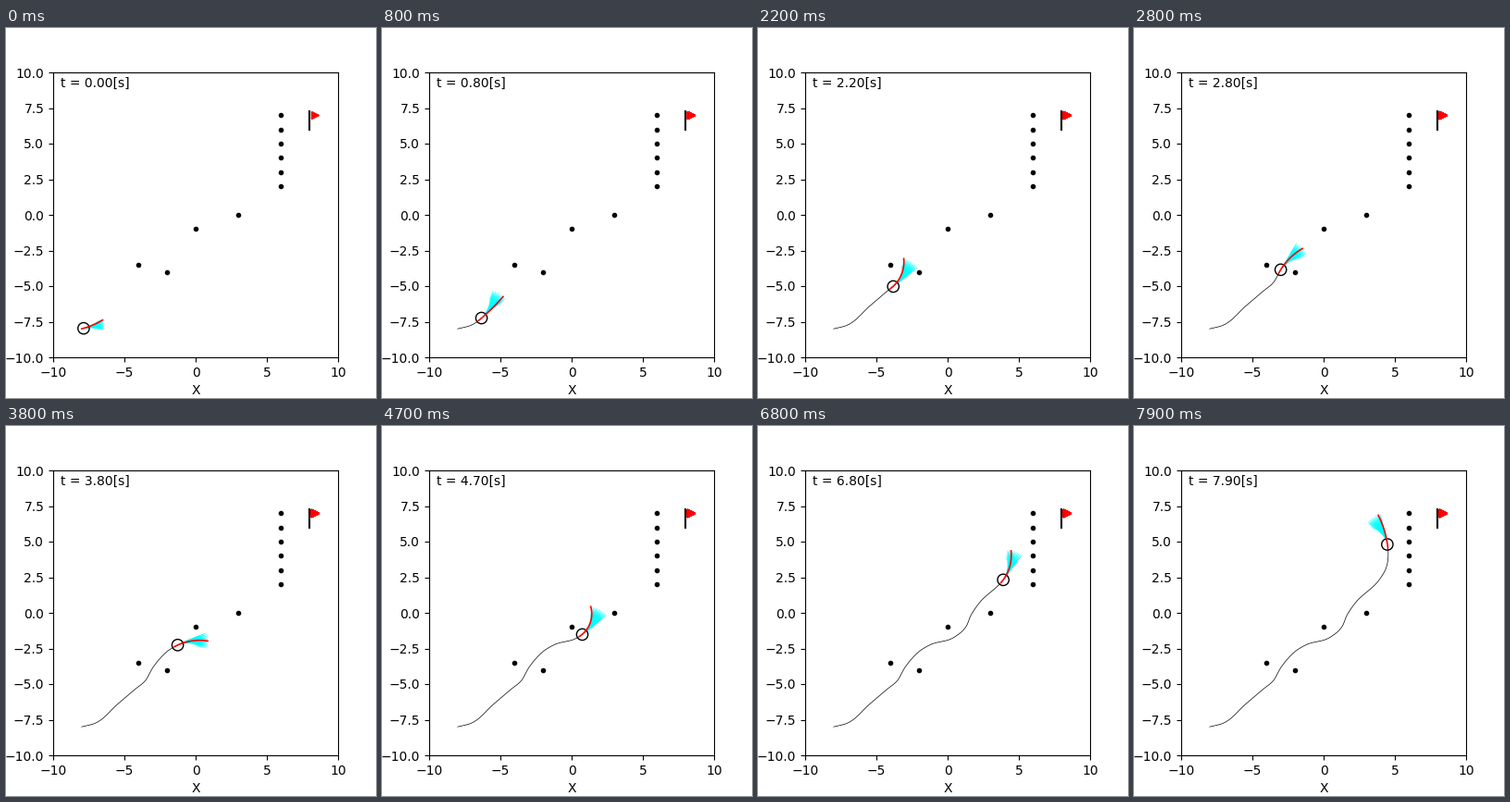
These frames come from a looping animation (400x400 px, 8 s). A matplotlib script:

```python
import numpy as np
import matplotlib.pyplot as plt
from matplotlib.animation import FuncAnimation
from matplotlib.collections import LineCollection

FRAMES, DT = 80, 0.1
CRUISE, LAG, RAMP = 2.4, 0.2, 0.25   # speed, distance lost and time to speed up
HORIZON = 0.9                        # seconds looked ahead

# Bends of the route between the obstacles
WAYPOINTS = np.array([
    (-8, -8), (-7.08, -7.76), (-5.42, -6.36), (-4.16, -5.29), (-3.6, -4.84),
    (-2.96, -3.78), (-1.85, -2.6), (-1.2, -2.23), (0.36, -1.77), (1.27, -1.01),
    (1.64, -0.16), (2.21, 0.68), (3.92, 2.34), (4.35, 3.05), (4.51, 4.58),
    (4.2, 5.7)])


def distances(p):
    return np.r_[0, np.hypot(*np.diff(p, axis=0).T).cumsum()]


def smooth(p, count=3000):
    """Cubic Hermite curve through the points p."""
    k = distances(p)
    m = np.gradient(p, k, axis=0)
    s = np.linspace(0, k[-1], count)
    i = np.clip(np.searchsorted(k, s, side="right") - 1, 0, len(k) - 2)
    h = (k[i + 1] - k[i])[:, None]
    u = (s - k[i])[:, None] / h
    return ((1 + 2 * u) * (1 - u) ** 2 * p[i] + u * (1 - u) ** 2 * h * m[i]
            + u * u * (3 - 2 * u) * p[i + 1] + u * u * (u - 1) * h * m[i + 1])


ROUTE = smooth(WAYPOINTS)
LENGTH = distances(ROUTE)
YAW = np.unwrap(np.arctan2(*np.gradient(ROUTE, axis=0).T[::-1]))


def travelled(t):
    def run(t):
        return CRUISE * t - LAG * (1 - np.exp(-t / RAMP))
    return run(t) - run(-DT)


def speed(t):
    return CRUISE - LAG / RAMP * np.exp(-t / RAMP)


def position(t):
    s = travelled(t)
    return np.array([np.interp(s, LENGTH, ROUTE[:, k]) for k in (0, 1)])


def heading(t):
    return np.interp(travelled(t), LENGTH, YAW)


def turn(t0, t1):
    return heading(t1) - heading(t0)


def arc(start, angle, bend, length, first=0.0):
    """Circular arc whose chord is turned by bend from the start angle."""
    s = np.linspace(first, 1, 12)
    r = length * s * np.sinc(bend * s / np.pi)
    a = angle + bend * s
    return np.column_stack([start[0] + r * np.cos(a), start[1] + r * np.sin(a)])


def best_arc(t):
    t0 = t - DT
    return arc(position(t0), heading(t0), 1.1 * turn(t0, t0 + 0.5),
               speed(t) * (HORIZON + DT))


def fan_arcs(t):
    mid, reach = turn(t - 0.2, t + 0.2), speed(t) * HORIZON
    return [arc(position(t), heading(t), mid + off, reach * v, 0.16)
            for v in np.linspace(0.75, 1, 5)
            for off in np.linspace(-0.25, 0.25, 11)]


fig, ax = plt.subplots(figsize=(4, 4), dpi=100)
ax.set_aspect("equal")
ax.set_xlim(-10, 10)
ax.set_ylim(-10, 10)
ax.set_xlabel("X")

obstacles = [(-4, -3.5), (-2, -4), (0, -1), (3, 0)] + [(6, y) for y in range(2, 8)]
ax.plot(*zip(*obstacles), "k.")
ax.plot([8, 8], [6, 7.3], "k-")
flag, = ax.plot([], [], "r>")

trail, = ax.plot([], [], "k-", lw=0.5)
fan = ax.add_collection(LineCollection([], colors="cyan", linewidths=0.35, zorder=2))
body = ax.add_patch(plt.Circle((0, 0), 0.4, fill=False, ec="k", lw=1, zorder=3))
best, = ax.plot([], [], "r-", lw=1.2, zorder=4)
clock = ax.text(-9.5, 9, "")


def update(n):
    t = n * DT
    trail.set_data(*position(np.arange(n + 1) * DT - DT))
    fan.set_segments(fan_arcs(t))
    best.set_data(*best_arc(t).T)
    body.center = tuple(position(t))
    # The flag is stamped again each step, which hardens its edge
    flag.set_data([8.35] * (n + 1), [7] * (n + 1))
    clock.set_text(f"t = {t:.2f}[s]")
    return trail, fan, best, body, flag, clock


anim = FuncAnimation(fig, update, frames=FRAMES, interval=100, repeat=True)
plt.show()
```
